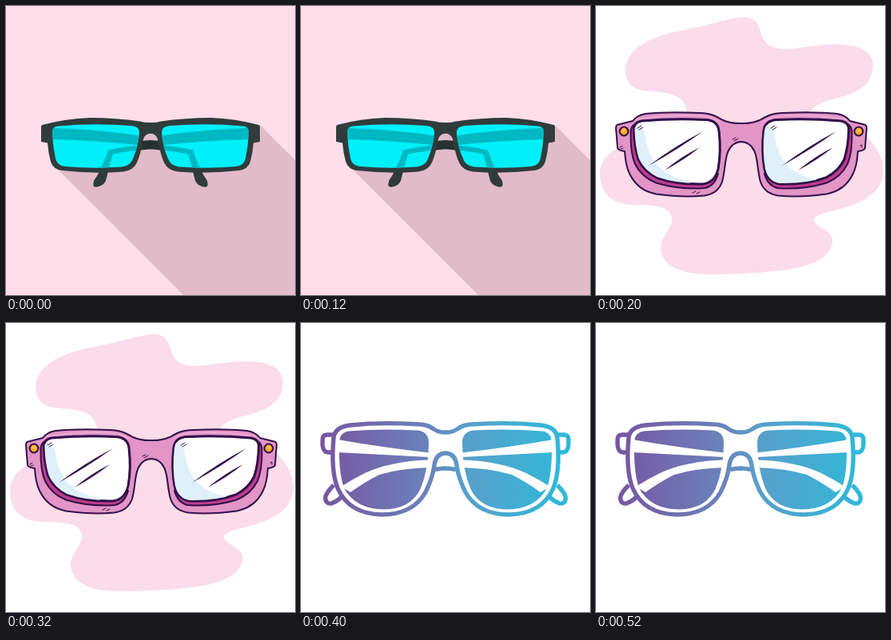
Animation, 362 px wide and 362 px high, one loop 0.6 s. Source, as an HTML page without scripts:

```html
<!DOCTYPE html>
<html lang="en">
<head>
<meta charset="utf-8">
<title>Glasses</title>
<style>
  html, body { margin: 0; width: 100%; height: 100%; overflow: hidden; background: #fff; }
  svg { display: block; width: 100vw; height: 100vh; }
  .look { visibility: hidden; animation: show 600ms step-end infinite; }
  .flat { animation-delay: 0ms; }
  .cartoon { animation-delay: -400ms; }
  .gradient { animation-delay: -200ms; }
  @keyframes show {
    0% { visibility: visible; }
    33.3333%, 100% { visibility: hidden; }
  }
  .ink { fill: none; stroke: #32104a; stroke-width: 2; stroke-linecap: round; stroke-linejoin: round; }
  .fine { stroke-width: 1; }
  .on { fill: none; stroke: #fff; stroke-width: 5.4; stroke-linejoin: round; }
</style>
</head>
<body>
<svg viewBox="0 0 362 362">
  <defs>
    <path id="flatLens" d="M58 158Q57.500 151.500 65 150.500Q110 146.500 157 150Q168 151 167 159C166 171 163 182 159.500 190Q156 200.500 145 201.500Q110 204 74 201Q64 200 62 191Q58.500 175 58 158Z"/>
    <clipPath id="flatClip"><use href="#flatLens"/></clipPath>
    <g id="flatHalf">
      <path d="M118 205Q115 212 110.500 218Q108.500 223 110 226Q114 228 121 224Q125 221 126 215L128.500 205Z" fill="#303c3c"/>
      <path d="M181 168Q172 168 164 171V182Q172 179 181 179.500Z" fill="#263232"/>
      <path fill="#303c3c" fill-rule="evenodd" d="M182 146Q175 146.500 168 144.500Q138 140 105 140Q75 141 45 149L44 151V170L52 171.500Q53 184 56 195Q59 204.500 70 206Q110 210.500 147 207.500Q159 206 163.500 197C168 188 170 176 172 167Q174 159.500 182 159.500Z"/>
      <use href="#flatLens" fill="#00f0fa"/>
      <g clip-path="url(#flatClip)" fill="#00b8c1">
        <path d="M55 153Q110 154 172 163V175Q110 168 55 167Z"/>
        <path d="M172 174Q148 176 128 180.500Q125 190 118 205H128Q131 196 134 185.500Q150 182 172 180Z"/>
      </g>
    </g>

    <path id="toonLens" d="M47.500 156Q46.500 146 57 144Q98 140.500 137 142.500Q152 143 154 156Q157 182 153 204Q149 221 134 223Q101 224 76 215Q60 207 53 192Q48 176 47.500 156Z"/>
    <clipPath id="toonClip"><use href="#toonLens"/></clipPath>
    <clipPath id="toonClipRight"><use href="#toonLens" transform="matrix(-1 0 0 1 364 0)"/></clipPath>
    <g id="toonHalf">
      <path id="toonRim" fill="#e295c6" d="M183 147Q169 147.500 159 143C150 138 145 134.500 130 134Q90 132 62 135Q51 137 46 144L28 148.500Q25 149 25 153L27 178Q28 181 36 182Q37 200 42 210Q52 231 75 235.500Q108 240 136 237.500Q153 235 158 220C162 206 161 192 165.500 182Q171 170 183 170"/>
      <path d="M50 142Q90 135.500 132 137.500Q145 139 155 145" fill="none" stroke="#eba9d2" stroke-width="2"/>
      <use href="#toonRim" class="ink" style="fill-opacity:0"/>
      <path class="ink" style="fill:#bd3d8c" d="M49 148Q43 151 43.500 160Q43 184 49 198Q57 214 75 221.500Q105 230.500 137 228Q149 225 153 210Z"/>
      <use href="#toonLens" class="ink" style="fill:#fff;stroke-width:3"/>
      <circle cx="35" cy="157" r="5.400" fill="#f7a823" stroke="#32104a" stroke-width="2"/>
      <circle cx="34.500" cy="156" r="2.300" fill="#ffc84a"/>
    </g>
    <g id="shine">
      <path fill="#32104a" d="M66 200Q98 176 134 157Q102 180 66 200ZM86 206Q106 189 130 177Q110 193 86 206Z"/>
      <path class="ink fine" d="M52 153L57 150M54 155L59 152"/>
    </g>

    <linearGradient id="hue" gradientUnits="userSpaceOnUse" x1="25" y1="0" x2="338" y2="0">
      <stop offset="0" stop-color="#7855a0"/>
      <stop offset=".43" stop-color="#6a83bb"/>
      <stop offset=".57" stop-color="#599fcb"/>
      <stop offset="1" stop-color="#2dbad9"/>
    </linearGradient>
    <g id="lineHalf">
      <path class="on" d="M41 203Q31 213 30.500 219Q31 227 38 226Q46 223 52 217"/>
      <path class="on" d="M42 140H33Q27 140 27 146V153Q28 162 34 162H40"/>
      <path id="brow" fill="#000" d="M182 137Q172 137.500 165 132Q158 127 145 126.800Q100 124 62 128Q43 130 41 143Q37 185 46 207Q60 239 101 240Q140 240 156 212Q165 194 167 178Q169 163 182 163"/>
      <use href="#brow" class="on" style="fill-opacity:0"/>
      <path fill="#fff" d="M48 150Q48 137 60 135.500Q100 132 146 134.500Q160 136 160 150Q160 182 150 207Q138 233 104 233.500Q68 233 54 207Q47 188 48 150Z"/>
      <path fill="#000" d="M46 146Q103 156 161 162.500V168Q103 165 46 162ZM161 171.500Q112 173 80 188Q64 196 50 205L62 212Q80 199 98 190Q124 182 161 181Z"/>
      <path class="on" d="M168 183.500Q175 182 182 182"/>
    </g>
    <mask id="lines" maskUnits="userSpaceOnUse" x="0" y="0" width="362" height="362">
      <use href="#lineHalf"/>
      <use href="#lineHalf" transform="matrix(-1 0 0 1 362 0)"/>
    </mask>
  </defs>

  <g class="look flat">
    <rect width="362" height="362" fill="#ffdeea"/>
    <path d="M60 200L222 362H362V193L318 149L180 150Z" fill="#e1bbc8"/>
    <use href="#flatHalf"/>
    <use href="#flatHalf" transform="matrix(-1 0 0 1 362 0)"/>
  </g>

  <g class="look cartoon">
    <rect width="362" height="362" fill="#fff"/>
    <path fill="#fadcea" d="M37 80C38 50 75 38 100 32C140 25 165 15 185 14C205 15 203 27 209 40C216 57 240 55 265 51C310 44 347 48 347 75C346 100 325 110 300 116C285 119 270 126 268 134L325 152C345 165 360 185 360 207C359 238 325 250 295 257C272 262 268 268 278 275C290 283 298 286 296 298C292 318 262 328 234 331C200 335 170 336 140 336C105 336 82 325 81 303C82 285 100 275 94 262C88 247 60 250 45 249C15 248 4 230 5 207C8 185 30 173 60 165C90 158 120 150 113 127C107 106 75 108 60 106C45 104 37 96 37 80Z"/>
    <use href="#toonHalf"/>
    <use href="#toonHalf" transform="matrix(-1 0 0 1 364 0)"/>
    <g fill="#e0f0fb">
      <path clip-path="url(#toonClip)" d="M47 152Q60 149 62 163C66 195 84 214 118 219V226H76L47 200Z"/>
      <path clip-path="url(#toonClipRight)" d="M208 150Q221 146 224 162C228 194 245 212 276 217V226H208Z"/>
    </g>
    <use href="#toonLens" class="ink"/>
    <use href="#toonLens" class="ink" transform="matrix(-1 0 0 1 364 0)"/>
    <use href="#shine"/>
    <use href="#shine" transform="translate(167)"/>
    <path class="ink fine" d="M171 167L175 165M173 169L178 166M121 234L125 232M126 235L130 233M30 177L33 175M31 179L34 178M331 175L333 174L333 177M304 229L307 227"/>
  </g>

  <g class="look gradient">
    <rect width="362" height="362" fill="#fff"/>
    <rect width="362" height="362" fill="url(#hue)" mask="url(#lines)"/>
  </g>
</svg>
</body>
</html>
```
